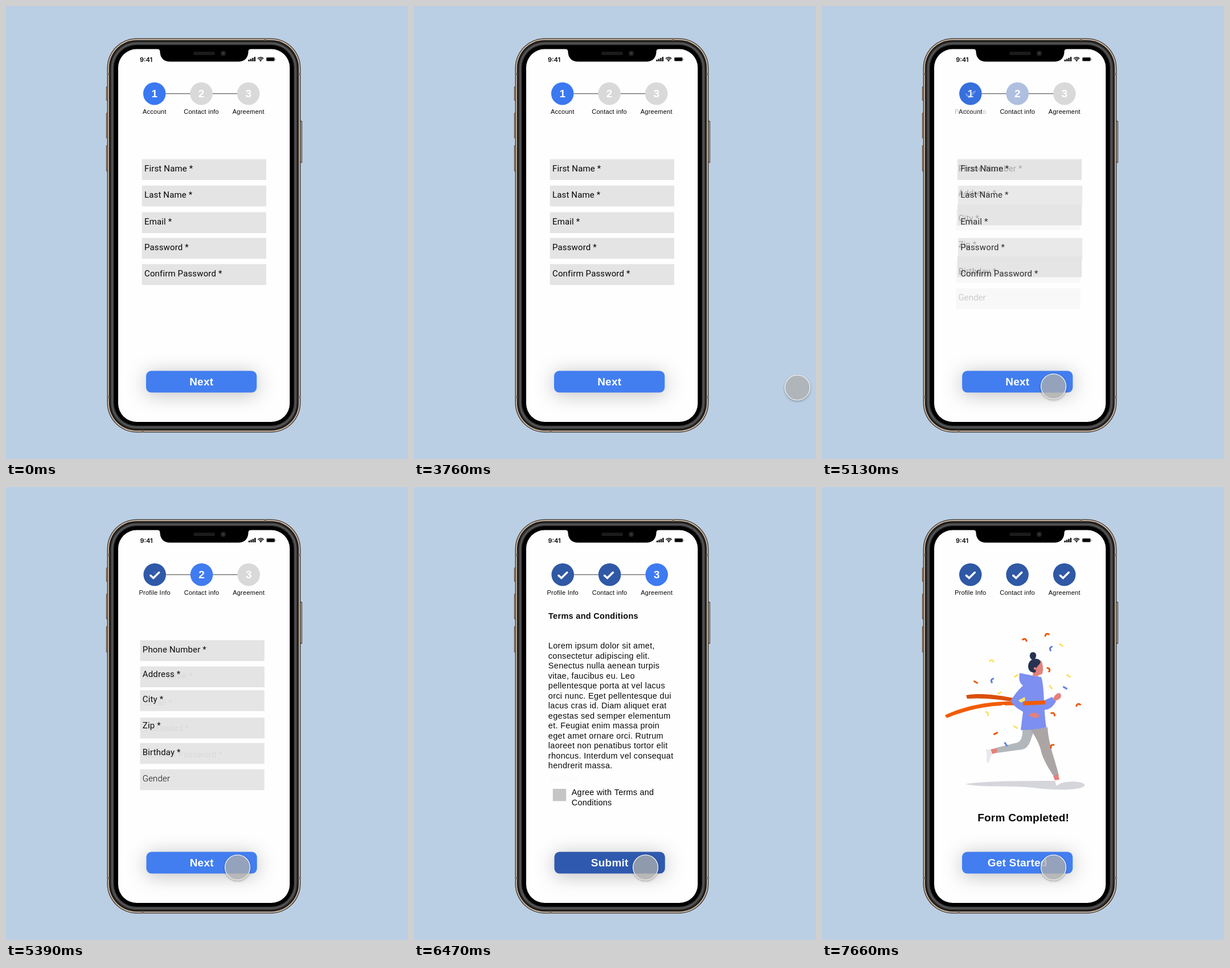
Recreate the animation shown at these times as an HTML page with a canvas. Size 706x794 px, loop 8 s.

```html
<!DOCTYPE html>
<html lang="en">
<head>
<meta charset="utf-8">
<title>Sign-up steps</title>
<style>
html, body { margin: 0; width: 100%; height: 100%; overflow: hidden; background: #bbcfe4; }
canvas { display: block; width: 706px; height: 794px; }
</style>
</head>
<body>
<canvas id="stage" width="706" height="794"></canvas>
<script>
const ctx = document.getElementById('stage').getContext('2d');
const LOOP = 8000, FPS = 15;
const SANS = '"Liberation Sans", Arial, sans-serif';
const ROBOTO = 'Roboto, sans-serif';
const WHITE = [255, 255, 255], GRAY = [217, 217, 217], BLUE = [58, 120, 242], DARK = [47, 88, 165];
const BTN = [66, 126, 240], BTN_DARK = [47, 88, 172], ORANGE = [217, 79, 10];

const lerp = (a, b, p) => a + (b - a) * p;
const mix = (a, b, p) => a.map((v, i) => lerp(v, b[i], p));
const rgb = c => `rgb(${c.map(Math.round).join(',')})`;
const clamp = v => Math.min(1, Math.max(0, v));
const gone = p => 1 - p ** 1.3;

// cubic-bezier(0, 0, .58, 1)
function easeOut(x) {
  let lo = 0, hi = 1;
  for (let i = 0; i < 20; i++) {
    const s = (lo + hi) / 2;
    if (1.74 * s * s * (1 - s) + s ** 3 < x) lo = s; else hi = s;
  }
  const y = 3 * lo * lo * (1 - lo) + lo ** 3;
  return y > 0.98 ? 1 : y;
}
const dissolve = (n, start) => n <= start ? 0 : n >= start + 6 ? 1 : easeOut((n - start) / 6);

function box(x, y, w, h, r, fill) {
  ctx.beginPath();
  ctx.roundRect(x, y, w, h, r);
  ctx.fillStyle = fill;
  ctx.fill();
}

function disc(x, y, r, fill) {
  ctx.beginPath();
  ctx.arc(x, y, r, 0, Math.PI * 2);
  ctx.fillStyle = fill;
  ctx.fill();
}

function faded(alpha, draw) {
  if (alpha <= 0.002) return;
  ctx.save();
  ctx.globalAlpha *= clamp(alpha);
  draw();
  ctx.restore();
}

function text(str, x, y, font, { spacing = 0, align = 'left', color = '#050505', alpha = 1 } = {}) {
  faded(alpha, () => {
    ctx.font = font;
    ctx.letterSpacing = spacing + 'px';
    ctx.textAlign = align;
    ctx.fillStyle = color;
    ctx.fillText(str, x, y);
  });
}

function path(d, fill) {
  ctx.fillStyle = fill;
  ctx.fill(new Path2D(d));
}

function drawPhone() {
  const metal = '#83705f';
  for (const [y, h] of [[141, 25], [187, 45], [244, 46]]) {
    box(175.8, y, 5, h, 1.5, '#544a41');
    box(176.8, y + 1, 2, h - 2, 1, '#c69a74');
  }
  box(514, 201, 6.2, 74, 1.5, '#544a41');
  box(517.2, 202.5, 1.8, 71, 1, '#b9a48f');

  const shells = [
    [0, '#4b423a'], [1.5, '#d8c6b5'], [3, '#6a5d50'], [3.8, '#161412'], [5.5, '#2b2b2b'],
    [7, '#484848'], [8.5, '#5a5a5a'], [10, '#3c3c3c'], [11.5, '#161616'], [12.5, '#000']
  ];
  for (const [d, fill] of shells) {
    box(177.5 + d, 56.5 + d, 340 - 2 * d, 691 - 2 * d, 52 - d, fill);
  }
  ctx.fillStyle = metal;
  for (const x of [177.5, 513.5]) for (const y of [117.5, 683.5]) ctx.fillRect(x, y, 4, 4);
  ctx.fillRect(453, 56.5, 4, 4);
  ctx.fillRect(238, 743.5, 4, 4);
  box(197, 75.5, 301.3, 653.5, 32.5, '#fefefe');
}

function drawNotch() {
  path('M264 75H432C427 75 425.5 77 425.5 81C425 91 419 97.5 408 97.5H288C277 97.5 271 91 270.5 81C270.5 77 269 75 264 75Z', '#000');
  box(329, 80, 38, 6, 3, '#1b1b1b');
  disc(381.5, 83, 4.8, '#1d1d20');
  disc(381.5, 83, 2.2, '#363640');
}

function drawStatus() {
  text('9:41', 235, 97.5, '600 11px Inter, sans-serif');
  ctx.fillStyle = '#050505';
  [3, 4.5, 6, 7.8].forEach((h, i) => ctx.fillRect(425.5 + i * 3.4, 97 - h, 2.4, h));
  ctx.strokeStyle = '#050505';
  ctx.lineWidth = 1.5;
  for (const r of [7, 4.4]) {
    ctx.beginPath();
    ctx.arc(447, 97, r, -Math.PI * 0.76, -Math.PI * 0.24);
    ctx.stroke();
  }
  path('M447 97.5L445 95Q447 93.6 449 95Z', '#050505');
  box(456.7, 89.8, 15.4, 7.2, 2, '#9a9a9a');
  box(457.5, 90.5, 13.8, 5.8, 1.4, '#050505');
  box(472.7, 92.2, 1.2, 2.4, 0.6, '#9a9a9a');
}

function check(x, y, { sx = 1, sy = 1, color = '#fff', alpha = 1 } = {}) {
  faded(alpha, () => {
    ctx.translate(x, y);
    ctx.scale(sx, sy);
    ctx.beginPath();
    ctx.moveTo(-7.3, 0.6);
    ctx.lineTo(-2.3, 5);
    ctx.lineTo(7.6, -4.8);
    ctx.strokeStyle = color;
    ctx.lineWidth = 3.6;
    ctx.lineCap = 'round';
    ctx.stroke();
  });
}

function drawStepper(p) {
  const [, p1, p2, p3] = p;
  const xs = [260.7, 343.1, 425.7], y = 153.6;
  xs.forEach((x, i) => {
    disc(x, y, 19.8, rgb(mix(mix(GRAY, BLUE, p[i]), DARK, p[i + 1])));
    text(String(i + 1), x, 160.4, 'bold 19px ' + SANS, { align: 'center', color: '#fff', alpha: gone(p[i + 1]) });
  });
  const label = (str, x, alpha) =>
    text(str, x, 189.2, '11px ' + SANS, { spacing: 0.25, align: 'center', alpha });
  label('Account', xs[0], gone(p1));
  label('Profile Info', xs[0], p1);
  label('Contact info', xs[1], 1);
  label('Agreement', xs[2], 1);

  const cy = 154.6;
  check(xs[0], cy, { alpha: p3 });
  check(xs[1], cy, { alpha: p3 });
  if (p3 < 1) {
    // this tick grows into the upper ribbon
    check(lerp(xs[0], 296, p3), lerp(cy, 368, p3), {
      sx: lerp(1, 4.6, p3), sy: lerp(1, 0.8, p3),
      color: rgb(mix(WHITE, ORANGE, p3)), alpha: p2 * (1 - p3 * p3)
    });
  }
  check(xs[0] + 82.5 * (p2 + p3), cy, { alpha: p1 });
  faded(gone(p3), () => {
    ctx.fillStyle = '#6e6e6e';
    ctx.fillRect(280.5, 152.9, 43, 1.4);
    ctx.fillRect(362.8, 152.9, 43.2, 1.4);
  });
}

const field = (x, y, alpha = 1) => faded(alpha, () => box(x, y, 218.3, 36.5, 0, '#e4e4e4'));

function drawForms(p1, p2) {
  const out = gone(p1), x = lerp(238.7, 235, p1);
  const opts = alpha => ({ spacing: 0.15, alpha });
  faded(1 - p2, () => {
    field(238.7, 314.8, out);
    field(238.7, 406.5, out);
    field(x, 268.4);
    field(x, lerp(361.4, 312.4, p1));
    field(x, lerp(452.6, 402.2, p1));
    field(235, 356.2, p1);
    field(235, 448.8, p1);
    field(235, 494.8, p1);
  });
  faded(gone(p2), () => {
    const first = { 'First Name *': 290, 'Last Name *': 336, 'Email *': 382.6, 'Password *': 428, 'Confirm Password *': 474 };
    for (const s in first) text(s, 243, first[s], '15px ' + ROBOTO, opts(out));
    const second = { 'Phone Number *': 290, 'Address *': 333.4, 'City *': 377.4, 'Zip *': 423.4, 'Birthday *': 470.4 };
    for (const s in second) text(s, 239.3, second[s], '15px ' + ROBOTO, opts(p1));
    text('Gender', 239.3, 516, '300 15px ' + ROBOTO, opts(p1));
  });
}

const TERMS = [
  'Lorem ipsum dolor sit amet,', 'consectetur adipiscing elit.', 'Senectus nulla aenean turpis',
  'vitae, faucibus eu. Leo', 'pellentesque porta at vel lacus', 'orci nunc. Eget pellentesque dui',
  'lacus cras id. Diam aliquet erat', 'egestas sed semper elementum', 'et. Feugiat enim massa proin',
  'eget amet ornare orci. Rutrum', 'laoreet non penatibus tortor elit', 'rhoncus. Interdum vel consequat',
  'hendrerit massa.'
];

function drawTerms(p2, p3) {
  const font = '14.5px ' + SANS, spacing = 0.3;
  faded(p2 * (1 - p3), () => {
    text('Terms and Conditions', 235.5, 231, 'bold ' + font, { spacing });
    TERMS.forEach((line, i) => text(line, 235.3, 283 + i * 17.53, font, { spacing }));
    box(243.3, 529, 23.4, 21.5, 0, '#c4c4c4');
  });
  faded(Math.min(1, p2 * 1.7) * gone(p3), () => {
    text('Agree with Terms and', 276.2, 540.3, font, { spacing: 0.22 });
    text('Conditions', 276.2, 557.8, font, { spacing: 0.22 });
  });
}

// x, y, angle in degrees, colour
const CONFETTI = [
  [356, 268, 20, 'o'], [395, 259, -25, 'o'], [420, 277, 32, 'y'], [402, 283, -70, 'b'],
  [298, 305, 10, 'y'], [341, 331, -30, 'y'], [398, 320, 65, 'o'], [270, 342, 28, 'o'],
  [299, 339, -70, 'b'], [312, 361, -28, 'y'], [433, 331, 30, 'y'], [402, 351, 50, 'y'],
  [427, 352, 30, 'b'], [450, 382, -20, 'o'], [290, 397, 65, 'y'], [406, 398, 35, 'o'],
  [305, 432, -25, 'o'], [340, 421, 30, 'y'], [323, 451, 55, 'b'], [404, 454, -45, 'o']
];
const PAPER = { o: '#e8590c', y: '#fbe36a', b: '#6a7fd8' };
const CURLED = new Set([0, 1, 3, 4, 6, 8, 13, 14, 15, 19]);

function drawConfetti() {
  CONFETTI.forEach(([x, y, deg, key], i) => {
    const bend = CURLED.has(i) ? 5 : 0;
    ctx.save();
    ctx.translate(x, y);
    ctx.rotate(deg * Math.PI / 180);
    ctx.beginPath();
    ctx.moveTo(-4.2, bend / 3);
    ctx.quadraticCurveTo(0, -bend, 4.2, bend / 3);
    ctx.strokeStyle = PAPER[key];
    ctx.lineWidth = 3;
    ctx.stroke();
    ctx.restore();
  });
}

function drawRunner() {
  const skin = '#e5807c', coat = '#7d8ff0', navy = '#263350';
  path('M252 521C275 516 330 515 410 515L412 523L420 519C430 516 445 515 455 518C464 521 464 525 452 528C430 532 400 531 370 527C330 523 285 527 252 521Z', '#d5d6dc');
  path('M253 365C280 360 312 365 342 371L341 377C315 373 285 369 255 371Z', '#d94f0a');
  path('M216 400C250 384 292 374 350 376L350 383C300 380 258 389 219 405Z', '#f25c05');
  path('M352 423C353 441 348 448 339 449L306 457L308 466L352 460C366 457 367 438 374 423Z', '#b1b7bb');
  path('M296 460L307 457.5L308 465.5L299 468Z', skin);
  path('M288 460L296 459.5L299 468C296 473 295 478 293 483L289 483C289 475 290 468 288 460Z', '#e8e9ee');
  path('M365 424C378 441 383 454 386 468C393 487 402 499 409 510L416 506C410 480 398 453 396 421Z', '#aca5a6');
  path('M406 507L414 503L417 512C414 516 411 515 409 514Z', skin);
  path('M409 514L417 513L420 518L412 524Z', '#fff');
  path('M386 376L404 368L411 376C404 388 396 391 388 391Z', coat);
  path('M406 371C408 365 413 361 417 361C421 364 421 369 416 372L410 375Z', skin);
  path('M347 326L372 331L385 333C391 350 389 392 394 421C379 425 364 426 349 426L353 394C344 389 336 383 331 375C338 364 345 355 353 348C345 342 346 334 347 326Z', coat);
  path('M371 318L385 304C388 311 389 320 387 327C384 330 380 328 379 332L370 331Z', skin);
  path('M383 304C386 309 379 312 376 318L375 325C364 327 360 317 363 309C367 300 378 299 383 304Z', navy);
  disc(374, 318, 2.2, skin);
  path('M370 289.5C378 289 378 300 371 303C363 302 363 290 370 289.5Z', navy);
  path('M349 376L392 374L392 381L349 383Z', '#f25c05');
  path('M355 366C346 371 341 375 337 380C344 386 351 391 357 397L353 384Z', coat);
  path('M364 400C366 395 373 395 378 397L382 401C378 407 370 405 364 400Z', skin);
  path('M345 374L356 368L357 374L349 378Z', '#fbe36a');
  path('M315 383Q319 380.5 323 383.5Z', '#fff');
  drawConfetti();
}

function drawButton(p2, p3) {
  ctx.save();
  ctx.shadowColor = 'rgba(0,0,0,.25)';
  ctx.shadowBlur = 34;
  ctx.shadowOffsetY = 4;
  box(246, 639.6, 194.3, 38, 9, rgb(mix(mix(BTN, BTN_DARK, p2), BTN, p3)));
  ctx.restore();
  const caption = (str, alpha) =>
    text(str, 343.2, 665.2, 'bold 19px ' + SANS, { spacing: 0.22, align: 'center', color: '#fff', alpha });
  caption('Submit', p2 * gone(p3));
  caption('Next', gone(p2));
  caption('Get Started', p3);
}

function cursorAt(n) {
  if (n >= 65) {
    const u = clamp((n - 65) / 3);
    return [lerp(408.2, 406.6, u), lerp(682, 666.8, u)];
  }
  const u = 1 - (1 - (n - 55) / 10) ** 1.6, v = 1 - u;
  const bez = (a, b, c, d) => a * v ** 3 + 3 * b * v * v * u + 3 * c * v * u * u + d * u ** 3;
  return [bez(740, 600, 430, 408.2), bez(608, 762, 762, 682)];
}

function drawCursor(n) {
  if (n < 56) return;
  const [x, y] = cursorAt(n);
  const pressed = [[72, 76], [89, 92], [107, 110]].some(([a, b]) => n >= a && n < b);
  const r = pressed ? 19.5 : 22;
  ctx.save();
  // keep the drop shadow outside the translucent disc
  ctx.beginPath();
  ctx.rect(0, 0, 706, 794);
  ctx.arc(x, y, r, 0, Math.PI * 2);
  ctx.clip('evenodd');
  ctx.shadowColor = 'rgba(0,0,0,.4)';
  ctx.shadowBlur = 4;
  ctx.shadowOffsetY = 1.5;
  disc(x, y, r, '#aaa');
  ctx.restore();
  disc(x, y, r, 'rgba(174,174,174,.77)');
  ctx.strokeStyle = '#f4f4f4';
  ctx.lineWidth = 1.3;
  ctx.stroke();
}

function draw(ms) {
  const n = Math.floor((ms % LOOP + 24) * FPS / 1000);
  const p = [1, dissolve(n, 75.95), dissolve(n, 91.7), dissolve(n, 109.5)];
  const [, p1, p2, p3] = p;
  ctx.fillStyle = '#bbcfe4';
  ctx.fillRect(0, 0, 706, 794);
  drawPhone();
  drawNotch();
  ctx.save();
  ctx.translate(0.5 * (p1 - p3), 0);
  drawStatus();
  drawForms(p1, p2);
  drawTerms(p2, p3);
  faded((p3 - 0.14) / 0.86, drawRunner);
  text('Form Completed!', 353.6, 586.2, 'bold 19px ' + SANS, { spacing: 0.24, align: 'center', alpha: p3 });
  drawButton(p2, p3);
  drawStepper(p);
  ctx.restore();
  drawCursor(n);
}

function tick(now) {
  draw(now);
  requestAnimationFrame(tick);
}
draw(0);
requestAnimationFrame(tick);
</script>
</body>
</html>
```
